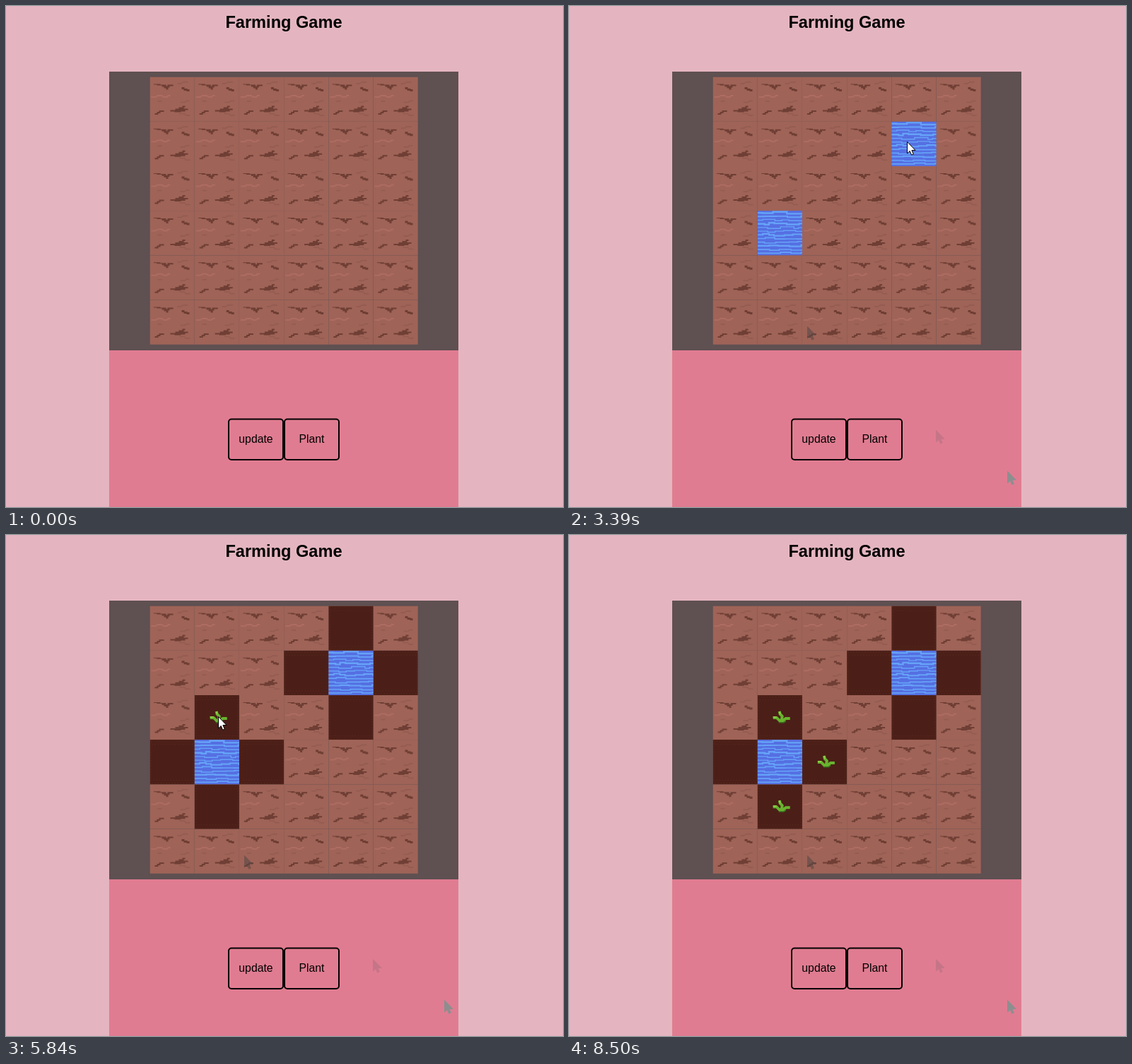
Write an HTML page that moves like this. It is 788 px wide and 710 px high and loops after 8700 ms.

```html
<!DOCTYPE html>
<html lang="en">
<head>
<meta charset="utf-8">
<title>Farming Game</title>
<style>
  html, body { margin: 0; width: 100%; height: 100%; overflow: hidden; background: #e4b5c0; }
  svg { display: block; width: 788px; height: 710px; font: 15.8px "Liberation Sans", Arial, sans-serif; }
  text { text-anchor: middle; }
  .button { fill: none; stroke: #000; stroke-width: 2; }
</style>
</head>
<body>
<svg viewBox="0 0 788 710">
  <defs>
    <symbol id="soil" viewBox="0 0 63.2 63.2">
      <rect width="64" height="64" fill="#9f6357"/>
      <path d="M39 9.500h5l3-2h7M42 52h7l2 2.500h6M11 34.500h6M43 36h6l3-2h4" fill="none" stroke="#935b51" stroke-width="1.5"/>
      <path d="M2 28.500h6l3-2h6l3 2h4l2-2h3" fill="none" stroke="#ae6c62" stroke-width="2"/>
      <g fill="#6f3e34">
        <path d="M5 10h10v1h8v2h2v-2h8v2h-5v2h-2v3h-3v-2h-3v-2h-3v-2h-7v-1h-4z"/>
        <path d="M45 14.500h4v2h4v1h3v3h-4v-1h-4v-2h-3z"/>
        <path d="M7 53.500v-2h3v-2h3v-2h7v2h-5v2h-3v2z"/>
        <path d="M29 49v-2h7v-2h5v-2h5v-2h4v2h-2v2h6v2h-4v2h-6v1h-9v-1z"/>
      </g>
    </symbol>
    <symbol id="wet" viewBox="0 0 63.2 63.2">
      <rect width="64" height="64" fill="#4b1f17"/>
      <path d="M1 2.500h62M3 6.500h60M1 57.500h62M3 61.500h60M2 1v62M61.500 1v62"
        fill="none" stroke="#57261e" stroke-width="1.2" stroke-dasharray="1.5 2.5"/>
    </symbol>
    <symbol id="water0" viewBox="0 0 63.2 63.2"><rect width="64" height="64" fill="#556fe2"/></symbol>
    <symbol id="water1" viewBox="0 0 63.2 63.2"><rect width="64" height="64" fill="#556fe2"/></symbol>
    <symbol id="sprout" viewBox="0 0 63.2 63.2">
      <g fill="none" stroke-linejoin="round">
        <path d="M30 38h7l3-2" stroke="#3c701e" stroke-width="3"/>
        <path d="M22 32h5l4 4h5l4-3h6M31 23l1 4 3 3-1 5" stroke="#68b32f" stroke-width="4"/>
        <path d="M22 31h5M31 23l1 4" stroke="#8ed047" stroke-width="2"/>
      </g>
    </symbol>
    <path id="arrow" d="M.5.500V17L4.200 13.500L6.600 19.200L9.300 18L6.900 12.500H12Z"/>
    <path id="hand" d="M-1.500 14V3Q-1.500 1.500 0 1.500T1.500 3V8Q4 7 4.500 9Q7 8 7.500 10Q10 9.500 10 12V17Q10 19 8.500 21V23.500H-1V21.500Q-3 19-5.500 14.500Q-6.500 12-4.500 12Q-3 12-1.500 14Z"/>
  </defs>

  <rect width="788" height="710" fill="#e4b5c0"/>
  <rect x="146" y="93" width="494" height="395" fill="#5f5052"/>
  <rect x="146" y="488" width="494" height="222" fill="#e07c91"/>
  <text x="393" y="30.500" font-size="23.6" font-weight="bold">Farming Game</text>
  <g id="field" transform="translate(203.5 100.5)"></g>
  <rect class="button" x="315" y="585.500" width="77" height="57.500" rx="4"/>
  <rect class="button" x="394" y="585.500" width="77" height="57.500" rx="4"/>
  <text x="353.500" y="619">update</text>
  <text x="432.500" y="619">Plant</text>
  <g id="trail"></g>
  <use id="cursor" fill="#fff" stroke="#000" stroke-linejoin="round"/>
</svg>

<script>
const LOOP = 8700, TILE = 63.2, RIPPLE = 600, WATERED = 4500;
const ENTER = 120, LEAVE = 8490;
const $ = id => document.getElementById(id);
const timed = [];

function add(parent, tag, attrs) {
  const node = document.createElementNS('http://www.w3.org/2000/svg', tag);
  for (const name in attrs) node.setAttribute(name, attrs[name]);
  return parent.appendChild(node);
}

function place(col, row, href, time = 0) {
  const node = add($('field'), 'use', { x: col * TILE, y: row * TILE, width: TILE, height: TILE, href });
  timed.push([node, time]);
  return node;
}

// Water: uneven stepped ripples, in two alternating states
for (const state of [0, 1]) {
  let seed = 7919 + state * 104729;
  const random = () => (seed = seed * 16807 % 2147483647) / 2147483647;
  for (let row = 0; row < 12; row++) {
    let d = `M0 ${3 + row * 5.2}`;
    for (let x = 0; x < 64;) {
      x += 6 + random() * 14;
      d += `H${x}V${3 + row * 5.2 + (random() - .5) * 3}`;
    }
    add($('water' + state), 'path',
      { d, fill: 'none', stroke: '#65a3f8', 'stroke-width': 1.4 + random() });
  }
}

for (let i = 0; i < 36; i++) place(i % 6, Math.floor(i / 6), '#soil');

// Each pool wets its four neighbours after the update
const pools = [[1, 3, 1050], [4, 1, 2990]].map(([col, row, time]) => {
  for (const [dx, dy] of [[0, -1], [1, 0], [0, 1], [-1, 0]])
    place(col + dx, row + dy, '#wet', WATERED);
  return place(col, row, '#water0', time);
});
for (const [col, row, time] of [[1, 2, 5770], [2, 3, 6180], [1, 4, 6570]])
  place(col, row, '#sprout', time);

// Marks the pointer leaves behind on its way in
for (const [time, x, y, color, opacity] of [
  [255, 620, 659, '#85908f', .9],
  [320, 519, 601, '#a06c7c', .4],
  [455, 337, 454, '#5c4a48', .6]
]) timed.push([add($('trail'), 'use', { href: '#arrow', x, y, fill: color, stroke: color, opacity }), time]);

// Pointer moves: start, end, x, y; it rests in between
const moves = [
  [0, ENTER, 692, 697], [ENTER, 330, 390, 537], [330, 540, 268, 300],
  [2190, 2390, 293, 302], [2390, 2900, 478, 192],
  [3660, 4180, 363, 640], [4240, 4450, 356, 617], [4850, 5110, 369, 535],
  [5110, 5640, 300, 257], [5900, 6100, 361, 318], [6250, 6510, 299, 387],
  [6650, 6850, 252, 350], [6850, 7300, 356, 599],
  [7400, 7570, 397, 618], [7570, 7900, 718, 604], [8050, LEAVE, 737, 696]
];

function pointerAt(t) {
  let x = 692, y = 697;
  for (const [start, end, toX, toY] of moves) {
    const k = Math.min(1, Math.max(0, (t - start) / (end - start)));
    x += (toX - x) * k;
    y += (toY - y) * k;
  }
  return [Math.round(x), Math.round(y)];
}

const show = (node, on) => node.setAttribute('visibility', on ? 'visible' : 'hidden');

function draw(t) {
  for (const [node, time] of timed) show(node, t >= time);
  const state = Math.floor((t + RIPPLE - 390) / RIPPLE) % 2;
  for (const pool of pools) pool.setAttribute('href', state ? '#water1' : '#water0');

  const [x, y] = pointerAt(t), cursor = $('cursor');
  const overButton = x > 314 && x < 472 && y > 585 && y < 644;
  show(cursor, t >= ENTER && t < LEAVE);
  cursor.setAttribute('href', overButton ? '#hand' : '#arrow');
  cursor.setAttribute('x', x);
  cursor.setAttribute('y', y);
}

const origin = performance.now();
function tick() {
  draw((performance.now() - origin) % LOOP);
  requestAnimationFrame(tick);
}
tick();
</script>
</body>
</html>
```
